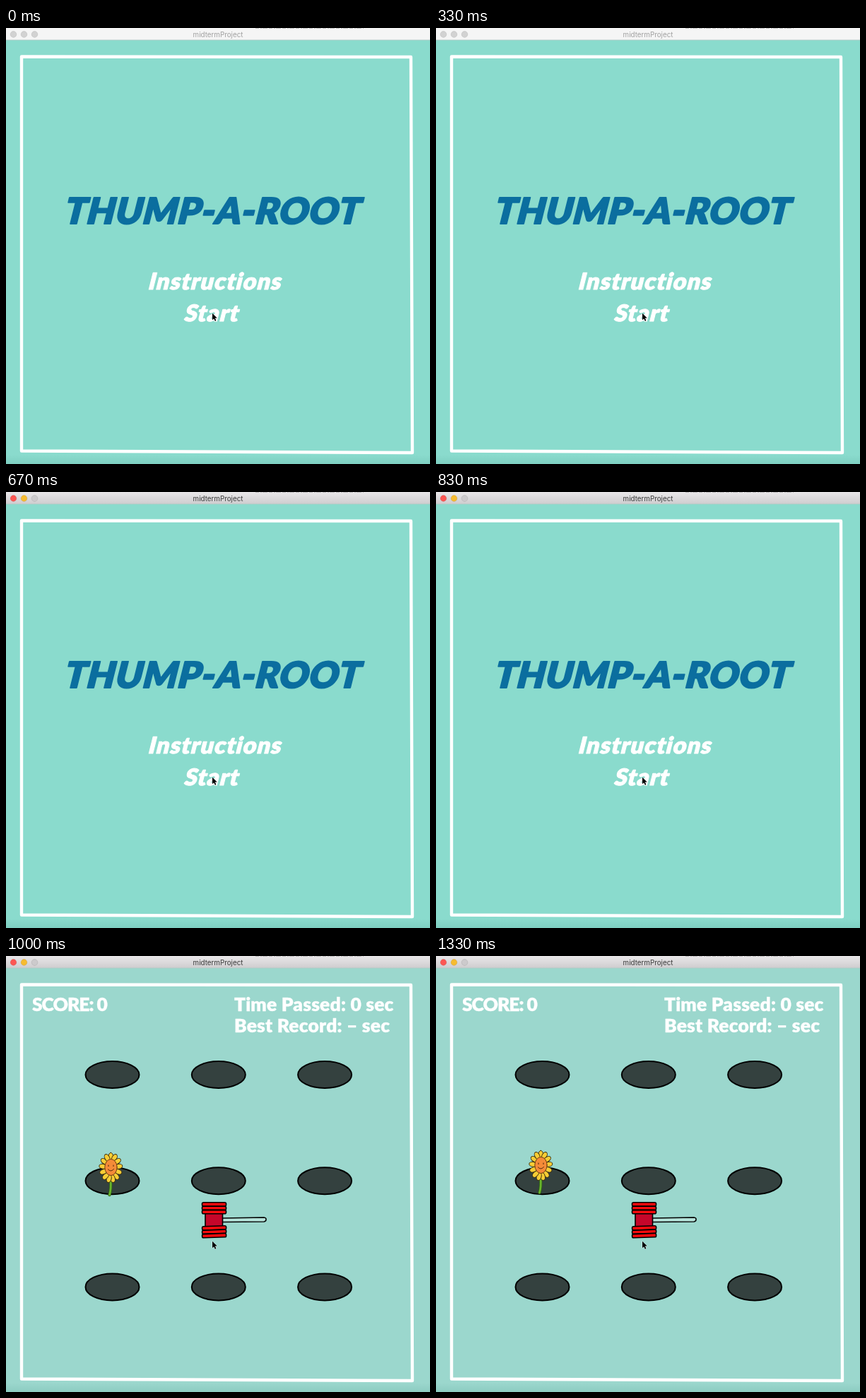
Animation, 600 px wide and 617 px high, one loop 1.41 s. Source, as an HTML page:

```html
<!DOCTYPE html>
<html lang="en">
<meta charset="utf-8">
<title>midtermProject</title>
<style>
  html, body { margin: 0; height: 100%; overflow: hidden; background: #8adbcd; }
  svg { display: block; width: 100%; height: 100%; }
  text { font-family: Lato, sans-serif; font-weight: 900; }
  #menu text { text-anchor: middle; stroke-linejoin: round; }
  #game > text { fill: #fff; stroke: #fff; stroke-width: .4px; font-size: 26.4px; letter-spacing: .2px; }
  #game > .score { letter-spacing: -1px; }
  #caption { font: 9.8px Inter, sans-serif; text-anchor: middle; }
  .ink { stroke: #000; stroke-linejoin: round; stroke-linecap: round; }
</style>
<svg viewBox="0 0 600 617">
  <defs>
    <linearGradient id="chrome" x2="0" y2="1">
      <stop stop-color="#e9e7e9"/><stop offset="1" stop-color="#cfcdcf"/>
    </linearGradient>
    <linearGradient id="shade" x2="0" y2="1">
      <stop stop-color="#3a8c80" stop-opacity="0"/><stop offset="1" stop-color="#3a8c80" stop-opacity=".15"/>
    </linearGradient>
  </defs>

  <rect id="field" width="600" height="617"/>
  <rect y="604" width="600" height="13" fill="url(#shade)"/>
  <path d="M22 40.5L573 41L575 601L22 598.5Z" fill="none" stroke="#fff" stroke-width="4.4" stroke-linejoin="round"/>

  <g id="menu">
    <text transform="translate(289.5 276.5) skewX(-14)" font-size="51" letter-spacing=".7" fill="#0b6e9f" stroke="#0b6e9f" stroke-width="2">THUMP-A-ROOT</text>
    <g fill="#fff" stroke="#fff" stroke-width="1.1" font-size="32.4" letter-spacing="1.2">
      <text transform="translate(294.5 370) skewX(-14)">Instructions</text>
      <text transform="translate(289.5 414.5) skewX(-14)">Start</text>
    </g>
  </g>

  <g id="game">
    <text class="score" x="37" y="78">SCORE: 0</text>
    <text x="323" y="78">Time Passed: 0 sec</text>
    <text x="323" y="108">Best Record: – sec</text>
    <g id="holes" class="ink" fill="#34413f" stroke-width="2"></g>
    <g id="flower" class="ink" stroke-width="1">
      <path d="M148 318 Q149 329 146.5 338" fill="none" stroke="#2c5a16" stroke-width="4.4"/>
      <path d="M148 318 Q149 329 146.5 338" fill="none" stroke="#69b52c" stroke-width="2.8"/>
      <g id="petals" fill="#f7cd35" stroke="#3d3010"></g>
      <ellipse cx="148.5" cy="299" rx="8.7" ry="11.5" fill="#f48b38" stroke="#6b3b12"/>
      <path d="M145 296v1.6M152 296v1.6M144.5 302Q148.5 306.5 152.5 301.5" fill="none" stroke="#4a260c"/>
    </g>
    <g class="ink" stroke-width="1.6">
      <path d="M306 371 L365 370 Q368.5 370.5 368 373 Q368 375.5 365 376 L306 376.5Z" fill="#b5e3da"/>
      <rect x="282" y="363" width="24.5" height="20" fill="#c5062a"/>
      <g id="bars" fill="#fa0a0d"></g>
    </g>
  </g>

  <path d="M292 403.8v9.4l2.2-2 1.6 3.5 1.6-.7-1.6-3.4h3z" fill="#000" stroke="#fff" stroke-width=".8" paint-order="stroke"/>

  <rect id="bar" width="600" height="17"/>
  <path d="M0 17H600" stroke="#b4c8c4" stroke-width=".8"/>
  <path d="M353 .5H506" stroke="#777" stroke-opacity=".4" stroke-dasharray="5 2 2 1 7 2"/>
  <g id="lights" stroke="#000" stroke-opacity=".12" stroke-width=".7">
    <circle cx="10.5" cy="9" r="4.4"/><circle cx="25.5" cy="9" r="4.4"/><circle cx="40.5" cy="9" r="4.4"/>
  </g>
  <text id="caption" x="300" y="13">midtermProject</text>
</svg>
<script>
  const LOOP = 1410, FOCUS = 670, PLAY = 1000, STEP = 82;
  const $ = id => document.getElementById(id);
  const set = (node, name, value) => node.setAttribute(name, value);
  const fill = (id, count, draw) => {
    $(id).innerHTML = Array.from({ length: count }, (_, i) => draw(i)).join('');
  };

  fill('holes', 9, i =>
    `<ellipse cx="${150.5 + 150.3 * (i % 3)}" cy="${168 + 150.2 * Math.floor(i / 3)}" rx="38" ry="19"/>`);

  fill('petals', 13, i => {
    const a = i / 13 * 2 * Math.PI - Math.PI / 2;
    const x = 148.3 + 11 * Math.cos(a), y = 299.7 + 15.8 * Math.sin(a);
    return `<ellipse rx="5.6" ry="3.4" transform="translate(${x} ${y}) rotate(${a * 180 / Math.PI})"/>`;
  });

  fill('bars', 6, i => {
    const y = i < 3 ? 348.8 + 5.4 * i : 382.3 + 5.4 * (i - 3);
    const tilt = i < 3 ? 0 : -2;
    return `<rect x="277.5" y="${y}" width="34" height="5.2" rx="2" transform="rotate(${tilt} 294 ${y})"/>`;
  });

  function render(t) {
    const focused = t >= FOCUS, playing = t >= PLAY;
    set($('field'), 'fill', playing ? '#9bd7cd' : '#8adbcd');
    set($('menu'), 'display', playing ? 'none' : 'inline');
    set($('game'), 'display', playing ? 'inline' : 'none');
    set($('bar'), 'fill', focused ? 'url(#chrome)' : '#f5f5f5');
    set($('caption'), 'fill', focused ? '#3b3b3b' : '#a0a0a0');
    const colors = focused ? ['#fc5753', '#f6bb2f', '#cccacc'] : ['#d2d2d2', '#d2d2d2', '#d2d2d2'];
    [...$('lights').children].forEach((light, i) => set(light, 'fill', colors[i]));
    const rise = 0.75 * Math.max(0, Math.floor((t - PLAY) / STEP));
    set($('flower'), 'transform', `translate(0 ${-Math.min(rise, 3)})`);
  }

  function tick() {
    render(performance.now() % LOOP);
    requestAnimationFrame(tick);
  }
  tick();
</script>
</html>
```
